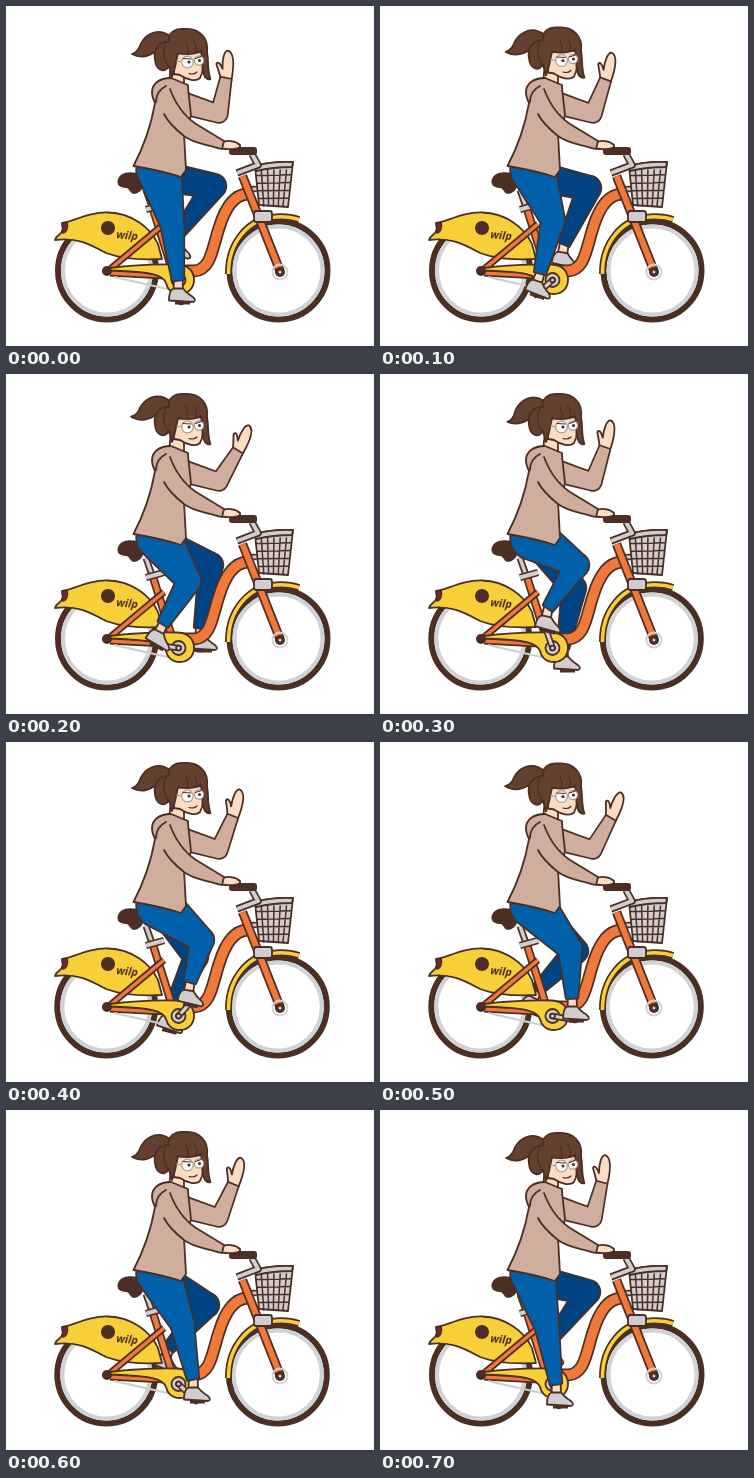
These frames come from a looping animation (368x340 px, 0.8 s). An HTML page:

```html
<!DOCTYPE html>
<html lang="en">
<head>
<meta charset="utf-8">
<title>Cyclist waving</title>
<style>
  html, body { margin: 0; width: 100%; height: 100%; overflow: hidden; background: #fff; }
  svg { display: block; width: 100%; height: 100%; }
  .ink { stroke: #4b2e24; stroke-width: 1.8; stroke-linejoin: round; stroke-linecap: round; }
  .line { fill: none; }
  .limb { stroke: #4b2e24; stroke-width: 3.4; stroke-linejoin: round; paint-order: stroke; }
  .dark { fill: #4b2e24; }
  .yellow { fill: #f7cf38; }
  .grey { fill: #cfcdce; }
  .coat { fill: #cfae9e; }
  .skin { fill: #fbdcc4; }
  .hair { fill: #64412f; }
  .near { fill: #0060a9; }
  .far { fill: #004484; }
  text { font: italic 700 11px "Open Sans", sans-serif; fill: #4b2e24; }
</style>
</head>
<body>
<svg viewBox="0 0 368 340">
  <defs>
    <g id="wheel" fill="none">
      <circle r="49" stroke="#4b2e24" stroke-width="6"/>
      <circle r="44" stroke="#d0d2d5" stroke-width="4"/>
    </g>
    <g id="foot">
      <path class="ink skin" d="M-4,-5 L4.5,-5 L5,11 L-4.5,11Z"/>
      <path class="ink grey" d="M-4.5,8.5 C-8,10 -9,14 -9,20.5 L15,22 C19,21 16,17 12,15 C9,13 7,11 5,8.5Z"/>
      <path class="dark" d="M-3,21 h15 v3.5 h-15Z"/>
    </g>
  </defs>

  <g id="wheels">
    <use href="#wheel" x="101" y="264.5"/>
    <use href="#wheel" x="272.5" y="264.5"/>
  </g>

  <path id="farCrank" class="line" stroke="#4b2e24" stroke-width="5"/>
  <use id="farFoot" href="#foot"/>
  <path id="farLeg" class="limb far"/>

  <g id="frame"></g>
  <path id="nearCrank" class="line" stroke="#4b2e24" stroke-width="6.5" stroke-linecap="round"/>
  <path id="nearCrankFill" class="line" stroke="#cfcdce" stroke-width="3.2" stroke-linecap="round"/>
  <circle cx="172.5" cy="274" r="2.4" class="ink grey"/>

  <use id="nearFoot" href="#foot"/>
  <path id="nearLeg" class="limb near"/>

  <g id="hand">
    <path class="ink skin" transform="rotate(-13 0 -36)" d="M-5,-34 C-5,-40 -7,-43 -9,-51 C-8,-54 -5,-52 -3,-46 C-3,-55 -1,-64 3,-64 C9,-62 9,-50 5.5,-34Z"/>
  </g>
  <path id="farArm" class="limb coat"/>

  <path class="ink skin" d="M165,58 L178,62 L178,78 L163,77Z"/>
  <path class="ink coat" d="M151,76 C145,81 145,89 149,97 C145,120 138,140 127.5,160 C145,163 160,166 175,171 L180,164 L178,128 L185,110 C184,98 182,86 182,79 L165,72 C160,72 155,73 151,76Z"/>
  <path class="ink skin" d="M215,136.5 C221,133.5 230,135 234,139 C236,143 224,144 216,142.5Z"/>
  <path class="coat" d="M160,84 C166,98 176,108 190,118 L218,135 L216,143 C200,139 186,136 178,130 C168,122 162,116 158,108Z"/>
  <path class="ink line" d="M164,83 C170,99 178,110 190,118 L218,135 L216,143 C200,139 186,136 178,130 C168,122 162,116 158,108 M150,96 C150,89 154,83 160,80"/>

  <g id="head">
    <path id="tail" class="ink hair" d="M164,28 C150,18 137,28 133,40 C131,44 129,45 126,46 C135,51 146,48 152,41 C156,37 160,36 164,36Z"/>
    <path class="ink skin" d="M167,46 L196,44 C198,56 197,65 194,70 C190,74 181,72 174,67 L168,66Z"/>
    <path class="ink hair" d="M163,34 C153,33 147,42 149,52 C150,62 158,66 163,58 L166,69 C169,62 170,54 172,45 C180,47 189,46 195,43 C197,53 195,63 199,69 C201,71 203,72 204.5,71 C201,62 203,54 201,44 C203,30 193,20 179,21 C168,20 161,26 163,34Z"/>
    <path class="ink line" d="M160,35 C156,42 157,51 162,58 M182,45 C182,40 181,36 180,33 M190,44 C191,40 190,36 188,33" style="stroke-width:1.2"/>
    <g fill="#fff" stroke="#a99d98" stroke-width="1.2">
      <circle cx="181.5" cy="54" r="5.8"/><circle cx="193" cy="52.5" r="4.6"/>
      <path d="M170,53 L176,54 M187,53 h1.5" fill="none"/>
    </g>
    <circle cx="183" cy="54" r="1.6" class="dark"/><circle cx="193.5" cy="52.5" r="1.6" class="dark"/>
    <path class="ink line" d="M177,50.5 L185,51 M189.5,50.5 L195,48.5 M183,65.5 Q188,67 191,64" style="stroke-width:1.2"/>
  </g>
</svg>
<script>
const $ = id => document.getElementById(id);
const ORANGE = '#f07838', GREY = '#cfcdce', YELLOW = '#f7cf38', INK = '#4b2e24';

const tube = (d, w, color) =>
  `<path d="${d}" fill="none" stroke="${INK}" stroke-width="${w + 3.4}" stroke-linejoin="round"/>` +
  `<path d="${d}" fill="none" stroke="${color}" stroke-width="${w}" stroke-linejoin="round"/>`;

function basket() {
  let bars = '';
  for (let i = 1; i < 6; i++) bars += `M${249 + i * 6.3},164 L${253 + i * 4.8},200 `;
  for (let i = 1; i < 5; i++) bars += `M${250 + i * .7},${162 + i * 7.6} L${286 - i},${161 + i * 7.8} `;
  return `<path class="ink grey" d="M249,160 Q267,155 287,156 L282,201 L253,199Z"/>
    <path d="${bars}" class="ink line" style="stroke-width:1.5"/>
    <path class="ink grey" d="M249,160 Q267,155 287,156 L286,161 Q267,161 250,165Z"/>`;
}

$('frame').innerHTML =
  tube('M245,183 L254,183', 3, GREY) +
  `<path class="ink dark" d="M113,173 C116,165 131,166 136,171 C139,177 136,186 128,187 C123,186 125,181 120,181 C114,181 111,178 113,173Z"/>` +
  tube('M140,184 L147,204', 3.5, GREY) +
  `<path class="ink yellow" d="M61,216 C74,212 86,206 102,206.5 C126,207 145,222 152,238 L156,253 C138,254 116,253 100,247 C85,239 72,231 49,234 C50,229 56,228 56,225Z"/>
   <path class="ink" fill="#7b2a22" d="M61,216 L56,217 L57,227 C61,226 62,221 61,216Z"/>
   <circle cx="102" cy="222" r="7" class="dark"/>
   <text x="110" y="232" transform="rotate(6 110 232)">wilp</text>` +
  tube('M147,203 L165,260', 5, ORANGE) +
  tube('M103,264 L158,218', 3.5, ORANGE) +
  tube('M140,203.5 L158,198.5', 4, GREY) +
  tube('M222.5,268 C222,236 243,212 270,211 Q283,210 293,213.5', 3.5, YELLOW) +
  tube('M160,265 L188,265 C205,264 206,243 213,222 C219,202 228,189 241,188', 9.5, ORANGE) +
  tube('M236.5,170 L274,265', 6, ORANGE) +
  tube('M104,267 L160,270', 3.5, ORANGE) +
  `<path d="M108,271 L166,284" stroke="#cfcdce" stroke-width="2"/>
   <path class="ink yellow" d="M104,262 C126,259 150,258 172,258.5 C183,259 188,266 188,274 C188,283 181,288 174,288 C165,288 161,282 160,277 C157,269 148,266 104,264.5Z"/>
   <circle cx="172.5" cy="274" r="7" class="ink grey"/>
   <circle cx="101" cy="265" r="5" class="dark"/>
   <circle cx="274" cy="266" r="7.5" fill="none" stroke="#d0d2d5" stroke-width="2"/>
   <circle cx="274" cy="266" r="5" class="dark"/>
   <circle cx="274" cy="266" r="1.5" class="grey"/>` +
  basket() +
  tube('M231,167 L252,159 L246,148', 4, GREY) +
  `<rect x="223" y="141" width="28" height="8" rx="3" class="dark"/>
   <rect x="248" y="205" width="18" height="11" rx="2.5" class="ink grey"/>`;

const HUB = [172.5, 274];
// knee x, y, ankle x, y, foot tilt
const NEAR = [
  [166, 217, 172, 274, 0], [173, 214, 160, 267, 18], [183, 207, 157, 250, 27], [197, 191, 168, 234, 12],
  [196, 198, 184, 240, 10], [190, 206, 192, 256, 0], [176, 213, 187, 269, 0], [167, 217, 176, 274, 0]];
const FAR = [
  [208, 180, 172, 228, 12], [209, 182, 184, 238, 10], [205, 191, 194, 254, 0], [194, 214, 183, 274, 0],
  [190, 215, 165, 266, 15], [196, 209, 157, 248, 25], [201, 195, 163, 238, 20], [208, 182, 171, 230, 12]];
const WAVE = [11, 20, 31, 19, 22, 29, 23, 14];
const BOB = [2, .5, -1, -1, 0, .5, 1, 2];
const TAIL = [0, 1, 4, -5, 0, 4, 0, 0];
const SHIFT = [0, 0, 0, -.7, -.7, -.7, -.7, 0];

// tapered rod from p to q, with a round or flat far end
function rod([px, py], r, [qx, qy], s, flat) {
  const a = Math.atan2(qy - py, qx - px), x = Math.sin(a), y = -Math.cos(a);
  const end = flat ? 'L' : `A${s},${s} 0 0 1 `;
  return `M${px + x * r},${py + y * r} L${qx + x * s},${qy + y * s} ${end}${qx - x * s},${qy - y * s}` +
    ` L${px - x * r},${py - y * r} A${r},${r} 0 0 1 ${px + x * r},${py + y * r}Z`;
}

function leg(side, hip, hipR, kneeR, [kx, ky, ax, ay, tilt]) {
  const knee = [kx, ky], ankle = [ax, ay], t = tilt * Math.PI / 180;
  $(side + 'Leg').setAttribute('d', rod(hip, hipR, knee, kneeR) + rod(knee, kneeR, ankle, 5.5, true));
  $(side + 'Foot').setAttribute('transform', `translate(${ankle}) rotate(${tilt})`);
  const pedal = [ax + 3 * Math.cos(t) - 22 * Math.sin(t), ay + 3 * Math.sin(t) + 22 * Math.cos(t)];
  const d = `M${HUB} L${pedal}`;
  $(side + 'Crank').setAttribute('d', d);
  if (side === 'near') $('nearCrankFill').setAttribute('d', d);
}

function pose(i) {
  leg('near', [153, 164], 22, 11.5, NEAR[i]);
  leg('far', [160, 171], 14, 11.5, FAR[i]);

  const elbow = [213, 108], a = WAVE[i] * Math.PI / 180;
  const wrist = [elbow[0] + 36 * Math.sin(a), elbow[1] - 36 * Math.cos(a)];
  $('farArm').setAttribute('d', rod([180, 98], 10, elbow, 8) + rod(elbow, 8, wrist, 5, true));
  $('hand').setAttribute('transform', `translate(${elbow}) rotate(${WAVE[i]})`);

  $('head').setAttribute('transform', `translate(0 ${BOB[i]})`);
  $('tail').setAttribute('transform', `rotate(${TAIL[i]} 160 31)`);
  $('wheels').setAttribute('transform', `translate(${SHIFT[i]} 0)`);
}

let start = null, shown = -1;
function tick(now) {
  if (start === null) start = now;
  const i = Math.floor((now - start) / 100) % 8;
  if (i !== shown) pose(shown = i);
  requestAnimationFrame(tick);
}
pose(0);
requestAnimationFrame(tick);
</script>
</body>
</html>
```
